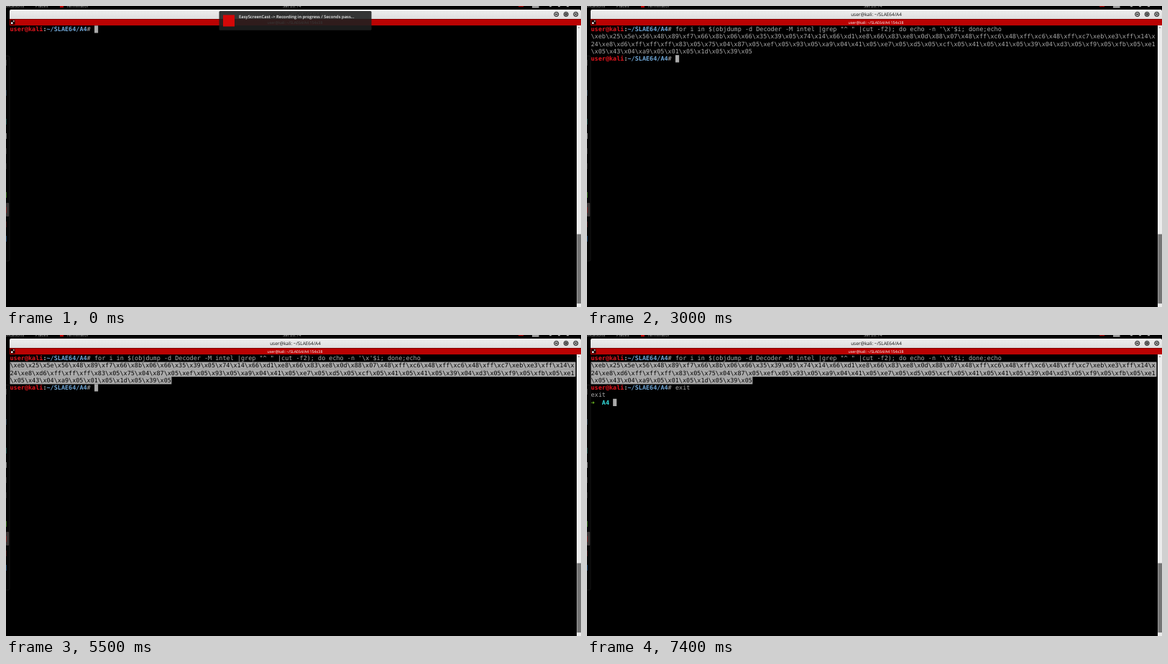
An HTML page for the animation above (8 s loop, 800x419 px).

```html
<!DOCTYPE html>
<html lang="en">
<head>
<meta charset="utf-8">
<title>Terminal session</title>
<style>
  html, body { margin: 0; width: 100%; height: 100%; overflow: hidden; background: #000; }
  svg { display: block; width: 800px; height: 419px; }
  text { white-space: pre; text-rendering: geometricPrecision; }
  .ui { font-family: "Open Sans", "Noto Sans", sans-serif; }
  .mono { font-family: "DejaVu Sans Mono", monospace; font-size: 8.488px; fill: #aaa; }
  .b { font-weight: bold; }
</style>
</head>
<body>
<svg id="stage" viewBox="0 0 800 419" xmlns="http://www.w3.org/2000/svg">
  <defs>
    <linearGradient id="bar" x1="0" y1="0" x2="0" y2="1">
      <stop offset="0" stop-color="#efefef"/><stop offset="1" stop-color="#dedede"/>
    </linearGradient>
    <clipPath id="selClip"></clipPath>
  </defs>
  <rect width="800" height="419"/>
  <g id="panel" class="ui" font-size="6" fill="#aaa"></g>
  <g id="dock"></g>

  <path d="M5 18V7q0-2 2-2H798q2 0 2 2V18z" fill="url(#bar)"/>
  <text class="ui title" x="402.5" y="14.2" font-size="6.45" font-weight="500" fill="#111" text-anchor="middle"></text>
  <g id="buttons" stroke="#222"></g>

  <rect id="strip" x="5" y="18.3" width="795" height="8.8"/>
  <g id="groupOn">
    <rect x="6" y="19.5" width="6.5" height="6.3" fill="#1a0000"/>
    <path d="M7 25V22.500h2.500V25zM10 20.300h1.500v1.500h-1.500z" fill="#eee"/>
  </g>
  <path id="groupOff" d="M6.500 20h5.500v5.200h-5.500zM9.200 20v5.200M6.500 22.600h5.500" fill="none" stroke="#333" stroke-width=".7"/>
  <text id="size" class="ui" x="402" y="24.500" font-size="5.25" font-weight="500" text-anchor="middle"></text>

  <g id="term">
    <g id="rows"></g>
    <g id="selBox" fill="#aaa"></g>
    <g id="selText" clip-path="url(#selClip)"></g>
    <rect id="cursor" width="5.1" height="10.2"/>
  </g>

  <rect x="794" y="27" width="6" height="392" fill="#ececec"/>
  <rect x="794.3" y="317.600" width="5.700" height="96.600" fill="#747474"/>
  <path d="M795.800 30.500l1.200-1.500 1.200 1.500z" fill="#666"/>

  <g id="menu" class="ui" font-size="6"></g>

  <g id="note">
    <rect x="296.500" y="7" width="212" height="26.800" rx="1.500" fill="#1f2020" fill-opacity=".89"/>
    <rect x="302" y="12.500" width="16" height="16" fill="#d40808"/>
    <text class="ui" x="324" y="16.600" font-size="5.85" font-weight="600" fill="#eee">EasyScreenCast -&gt; Recording in progress / Seconds pass...</text>
  </g>
</svg>
<script>
const $ = id => document.getElementById(id);
const LOOP = 8000, LEFT = 5.5, TOP = 27.3, CW = 5.11, LH = 10.25, COLS = 154;
const PATH = 'user@kali: ~/SLAE64/A4';
const CMD = String.raw`for i in $(objdump -d Decoder -M intel |grep "^ " |cut -f2); do echo -n '\x'$i; done;echo`;
const OUT = [
  String.raw`\xeb\x25\x5e\x56\x48\x89\xf7\x66\x8b\x06\x66\x35\x39\x05\x74\x14\x66\xd1\xe8\x66\x83\xe8\x0d\x88\x07\x48\xff\xc6\x48\xff\xc6\x48\xff\xc7\xeb\xe3\xff\x14\x`,
  String.raw`24\xe8\xd6\xff\xff\xff\x83\x05\x75\x04\x87\x05\xef\x05\x93\x05\xa9\x04\x41\x05\xe7\x05\xd5\x05\xcf\x05\x41\x05\x41\x05\x39\x04\xd3\x05\xf9\x05\xfb\x05\xe1`,
  String.raw`\x05\x43\x04\xa9\x05\x01\x05\x1d\x05\x39\x05`
];
const PROMPT = [['user@kali', '#e3151d'], [':', '#ccc'], ['~/SLAE64/A4', '#6fa6d6'], ['# ', '#aaa', 1]];
const PROMPT_LEN = 23;

function add(parent, tag, attrs, text) {
  const el = document.createElementNS('http://www.w3.org/2000/svg', tag);
  set(el, attrs);
  if (text != null) el.textContent = text;
  return parent.appendChild(el);
}
function set(el, attrs) {
  for (const k in attrs) el.setAttribute(k, attrs[k]);
}
const show = (el, on) => el.setAttribute('visibility', on ? 'visible' : 'hidden');
const rowY = r => TOP + r * LH;
const colX = c => LEFT + c * CW;

function line(parent, row, parts, col = 0) {
  const el = add(parent, 'text', { class: 'mono', x: colX(col), y: rowY(row) + 7.9 });
  for (const [s, fill, thin] of parts)
    add(el, 'tspan', { fill: fill || '#aaa', class: thin || !fill ? '' : 'b' }, s);
  return el;
}

// top panel, cut off by the edge of the screen
const panel = $('panel');
for (const [x, s] of [[-9, 'Applications'], [41, 'Places'], [84, 'Terminator'], [385, 'Sat 20:14']])
  add(panel, 'text', { x, y: 1.5 }, s);
add(panel, 'rect', { x: 75, y: 0, width: 5, height: 2.2, fill: '#b00' });
add(panel, 'rect', { x: 713, y: 0, width: 7, height: 1.2, fill: '#a00' });
add(panel, 'rect', { x: 732, y: 0, width: 9.5, height: 2.8, fill: '#999' });
for (const x of [756, 768, 780]) add(panel, 'rect', { x, y: 0, width: 3, height: 1.2 });

// dock edge
const dock = $('dock');
add(dock, 'path', { d: 'M0 69.500h3q2 0 2 2V353q0 2-2 2H0', fill: '#050505', stroke: '#1c1c1c', 'stroke-width': .7 });
add(dock, 'rect', { x: 0, y: 274, width: 4.2, height: 19, rx: 1, fill: '#3a3434' });
for (const [y, fill] of [[79, '#555'], [121, '#35506a'], [161, '#1c6660'], [181, '#bbb'], [202, '#444'],
  [223, '#333'], [263, '#4fae1e'], [284, '#a01818'], [304, '#5a1414'], [324, '#1c60a0']])
  add(dock, 'rect', { x: 0, y: y - 4, width: .6, height: 8, fill });

document.querySelector('.title').textContent = PATH;
$('size').textContent = PATH + ' 154x38';
[765.7, 779.2, 792.7].forEach((x, i) => {
  add($('buttons'), 'circle', { cx: x, cy: 11.5, r: 3.1, fill: '#a8a8a8' });
  const d = [`M${x - 1.5} 11.500h3`, `M${x - 1.1} 10.400h2.200v2.200h-2.200z`,
    `M${x - 1.2} 10.300l2.400 2.400m0-2.400l-2.400 2.400`][i];
  add($('buttons'), 'path', { d, fill: 'none' });
});

// terminal contents
line($('rows'), 0, PROMPT);
const cmd = line($('rows'), 0, [[CMD]], PROMPT_LEN);
const output = add($('rows'), 'g', {});
OUT.forEach((s, i) => {
  line(output, i + 1, [[s]]);
  line($('selText'), i + 1, [[s, '#000', 1]]);
});
line(output, 4, PROMPT);
const typed = line(output, 4, [['']], PROMPT_LEN);
const after = add($('rows'), 'g', {});
line(after, 5, [['exit']]);
line(after, 6, [['➜', '#79cf26']]);
line(after, 6, [['A4', '#34dede']], 3);

const bars = OUT.map((_, i) => ['selBox', 'selClip'].map(id =>
  add($(id), 'rect', { x: LEFT, y: rowY(i + 1), height: LH + .1, width: 0 })));

// context menu
const menu = $('menu');
add(menu, 'rect', { x: 229.3, y: 62.6, width: 73.5, height: 134.2, fill: '#f3f3f3' });
const hover = add(menu, 'rect', { x: 229.3, y: 62.8, width: 73.5, height: 12.2, fill: '#1b8fc8' });
const items = [['Copy', 69.3], ['Paste', 81], ['Split Horizontally', 93], ['Split Vertically', 105],
  ['Open Tab', 117], ['Close', 129.3], ['Zoom terminal', 141.8], ['Maximize terminal', 153.8],
  ['Show scrollbar', 166], ['Preferences', 178], ['Encodings', 190]].map(([s, y], i) =>
  add(menu, 'text', { x: 241.3, y: y + 2.1, fill: i == 6 || i == 7 ? '#8c8c8c' : '#2a2a2a' }, s));
for (const y of [87, 123.2, 135.6, 160]) add(menu, 'rect', { x: 230, y, width: 72.4, height: .5, fill: '#dcdcdc' });
add(menu, 'path', { d: 'M232.500 90.300h6.500v2.600h-6.500zM232.500 93.600h6.500v2.600h-6.500zM232.500 102h2.800v6.300h-2.800zM236.200 102h2.800v6.300h-2.800zM296 188l2 2-2 2z', fill: '#111' });
add(menu, 'rect', { x: 232.6, y: 163.2, width: 5.6, height: 5.6, fill: '#fff', stroke: '#888', 'stroke-width': .6 });
add(menu, 'path', { d: 'M233.800 166l1.300 1.500 2.200-3', fill: 'none', stroke: '#555', 'stroke-width': .7 });

// where the mouse drag has got to: [row, column]
function dragEnd(t) {
  const col = t < 4400 ? (t - 3900) / 500 * 32 : 32 + Math.min(1, (t - 4400) / 600) * 12;
  return [t < 4200 ? 0 : t < 4800 ? 1 : 2, Math.round(Math.max(0, col))];
}

function cursorOn(t) {
  if (t < 1300) return t < 600 || t >= 1100;
  if (t < 1500 || t >= 5600) return true;
  return Math.floor((t - 1500) / 600) % 2 == 0;
}

function draw(time) {
  const t = Math.floor(time / 100) * 100;

  const gone = Math.min(1, t / 400);
  show($('note'), gone < 1);
  set($('note'), { opacity: 1 - gone, transform: `translate(0 ${-20 * gone * gone})` });

  show(cmd, t >= 1300);
  show(output, t >= 1500);
  show(after, t >= 7400);
  const keys = [6700, 6900, 7000, 7200].filter(k => t >= k).length;
  typed.firstChild.textContent = 'exit'.slice(0, keys);

  const [endRow, endCol] = dragEnd(t);
  bars.forEach((pair, i) => {
    const n = t < 3900 || i > endRow ? 0 : i < endRow ? COLS : endCol;
    for (const r of pair) r.setAttribute('width', n * CW);
  });

  const open = t >= 5600 && t < 6200, hot = open && t >= 5800;
  show(menu, open);
  show(hover, hot);
  items[0].setAttribute('fill', hot ? '#fff' : '#2a2a2a');
  $('term').setAttribute('opacity', open ? .8 : 1);
  $('strip').setAttribute('fill', open ? '#d6d6d6' : '#ba0303');
  $('size').setAttribute('fill', open ? '#111' : '#fff');
  show($('groupOn'), !open);
  show($('groupOff'), open);

  const [row, col] = t >= 7400 ? [6, 6] : t >= 1500 ? [4, PROMPT_LEN + keys]
    : [0, PROMPT_LEN + (t >= 1300 ? CMD.length : 0)];
  const inset = open ? .3 : 0;
  set($('cursor'), {
    x: colX(col) + inset, y: rowY(row) + inset, width: CW - 2 * inset, height: 10.2 - 2 * inset,
    fill: open ? 'none' : '#aaa', stroke: open ? '#999' : 'none', 'stroke-width': .5
  });
  show($('cursor'), cursorOn(t));
}

const start = performance.now();
function tick() {
  draw((performance.now() - start) % LOOP);
  requestAnimationFrame(tick);
}
tick();
</script>
</body>
</html>
```
